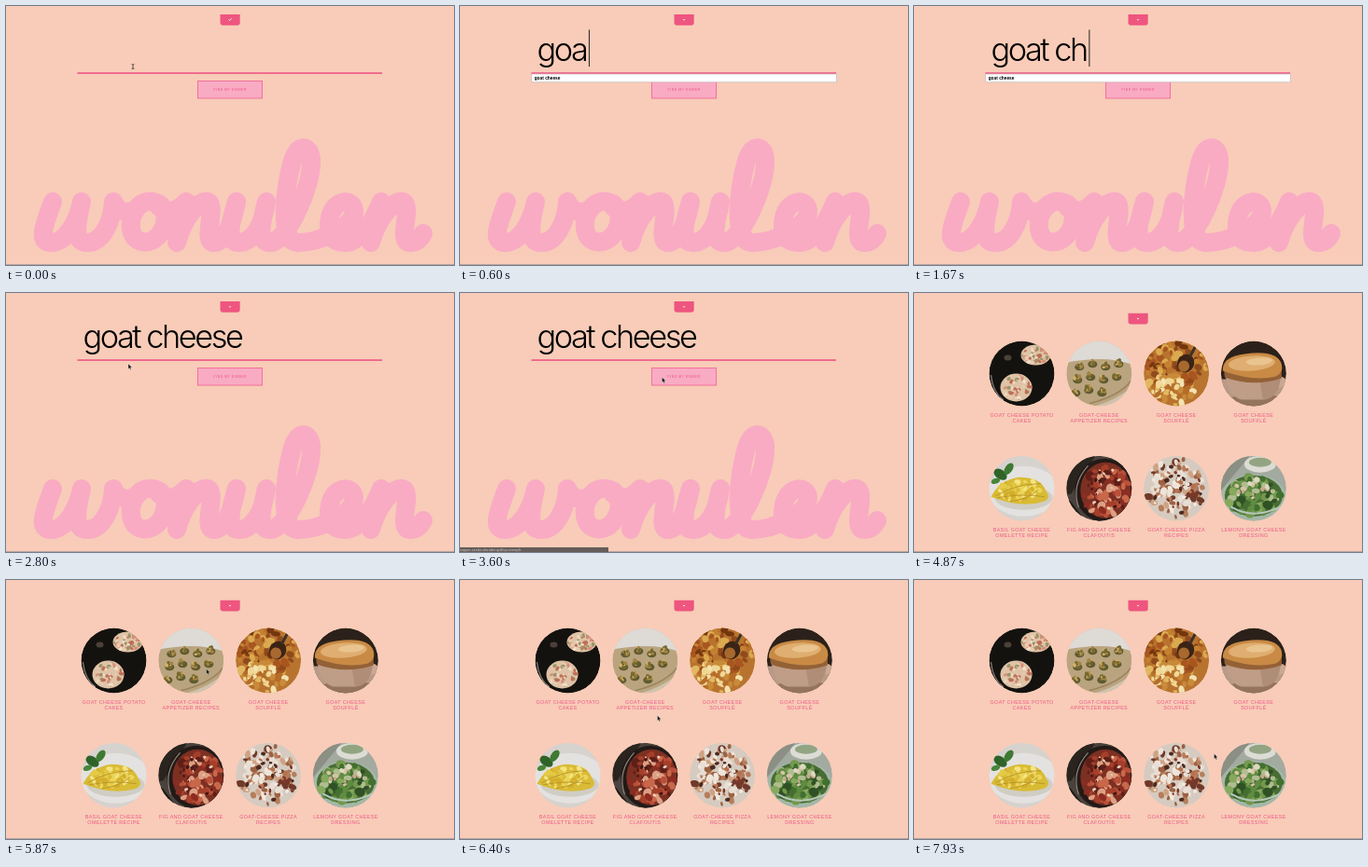
Write an HTML page that moves like this. It is 480 px wide and 278 px high and loops after 8 s.

```html
<!DOCTYPE html>
<html lang="en">
<head>
<meta charset="utf-8">
<title>Dinner finder</title>
<style>
html, body { margin: 0; width: 100%; height: 100%; overflow: hidden; background: #f8ccb8; }
svg { display: block; width: 100vw; height: 100vh; }
text { font-family: "Liberation Sans", Arial, sans-serif; white-space: pre; }
#typed { font: 300 34.3px Inter, sans-serif; letter-spacing: -2.45px; }
#list text { font-size: 4.8px; font-weight: bold; }
.label { font-size: 5.4px; letter-spacing: .38px; fill: #ee5686; text-anchor: middle; }
#button text { font-size: 3.3px; letter-spacing: .6px; fill: #ec5083; text-anchor: middle; }
#status text { font-size: 3.5px; font-weight: bold; fill: #fff; }
</style>
</head>
<body>
<svg id="stage" viewBox="0 0 480 278">
  <rect width="480" height="278" fill="#f8ccb8"/>
  <g id="home">
    <g fill="none" stroke="#f9abc4" stroke-width="20" stroke-linecap="round" stroke-linejoin="round">
      <path d="M50 210C43 230 32 254 48 254C65 254 77 230 81 210C76 232 71 254 87 254C104 254 114 230 115 210Q121 224 136 220"/>
      <path d="M161 211C145 205 132 222 134 239C137 260 162 257 169 237C173 224 170 214 161 211C169 226 184 220 193 210L183 254C190 228 207 207 216 210C227 214 209 254 223 254C234 254 243 232 247 210"/>
      <path d="M247 210C240 232 236 254 249 254C266 254 276 232 279 210C273 234 269 254 283 254C300 254 329 194 327 164C325 148 313 148 307 166C299 194 291 254 313 254"/>
      <path d="M313 254C334 254 374 238 373 219C371 205 351 208 347 227C343 245 350 254 363 254C379 254 393 232 402 210L391 254C398 228 416 207 425 210C437 214 418 254 433 254Q442 254 447 244"/>
    </g>
    <g id="button">
      <rect x="205.5" y="80.5" width="69" height="18.5" fill="#f9abc4" stroke="#f2709a"/>
      <text x="240.3" y="91">FIND MY DINNER</text>
    </g>
    <rect x="76.5" y="71.2" width="326.5" height="1.7" fill="#ef5c88"/>
    <g id="list"></g>
    <text id="typed" x="82.5" y="59"></text>
    <rect id="caret" y="25.5" width="1" height="39.5" fill="#222"/>
  </g>
  <g id="results"></g>
  <g id="tab">
    <path d="M229.5 9H250.7V17.8Q250.7 20.8 247.7 20.8H232.5Q229.5 20.8 229.5 17.8Z" fill="#ee557f"/>
    <path id="mark" fill="none" stroke="#fff" stroke-width=".8"/>
  </g>
  <rect y="277" width="480" height="1" fill="#b9a6a0"/>
  <g id="status">
    <rect y="273" width="159" height="5" fill="#665c59"/>
    <text x="0" y="276.9"></text>
  </g>
  <path id="beam" d="M134.6 62.5Q136 62.5 136 63.5Q136 62.5 137.4 62.5M136 63.5V67M134.6 67.6Q136 67.6 136 66.6Q136 67.6 137.4 67.6" fill="none" stroke="#333" stroke-width=".8"/>
  <path id="arrow" d="M0 0V5.6L1.3 4.4L2.2 6.5L3.1 6.1L2.2 4.1H4Z" fill="#111" stroke="#fff" stroke-width=".3"/>
</svg>
<script>
const LOOP = 8000;
const $ = id => document.getElementById(id);
const NS = "http://www.w3.org/2000/svg";

function add(parent, tag, attrs, text) {
  const el = document.createElementNS(NS, tag);
  for (const k in attrs) el.setAttribute(k, attrs[k]);
  if (text) el.textContent = text;
  parent.appendChild(el);
  return el;
}
const show = (el, on) => el.setAttribute("visibility", on ? "visible" : "hidden");

function random(seed) {
  return () => (seed = (seed * 16807) % 2147483647) / 2147483647;
}

// Dishes: each is painted around its own centre inside a circle of radius 35.
function oval(g, x, y, rx, ry, fill, turn = 0) {
  add(g, "ellipse", { cx: x, cy: y, rx, ry, fill, transform: `rotate(${turn} ${x} ${y})` });
}
function shape(g, d, fill) { add(g, "path", { d, fill }); }
function line(g, d, stroke, width) {
  add(g, "path", { d, stroke, "stroke-width": width, fill: "none", "stroke-linecap": "round" });
}
function scatter(g, seed, count, x, y, rx, ry, size, colors) {
  const rnd = random(seed * 7919);
  for (let i = 0; i < count; i++) {
    const a = rnd() * Math.PI * 2, r = Math.sqrt(rnd()), s = size * (.6 + rnd() * .7);
    oval(g, x + Math.cos(a) * r * rx, y + Math.sin(a) * r * ry, s, s * (.5 + rnd() * .4),
      colors[i % colors.length], rnd() * 180);
  }
}

const dishes = [
  { name: ["GOAT CHEESE POTATO", "CAKES"], base: "#14120f", paint(g) {
    line(g, "M-33 2Q-31 20-20 28", "#8a8580", 1.2);
    oval(g, -15, -17, 4, 3, "#4c4138");
    for (const [x, y, rx, ry] of [[15, -20, 16, 11], [-6, 15, 17, 15]]) {
      oval(g, x, y, rx, ry, "#dfc3a6");
      scatter(g, x + 40, 46, x, y, rx - 2, ry - 2, 2.2, ["#bd7058", "#f1dfca", "#9c9468", "#d48f78", "#e6cbb0"]);
    }
  } },
  { name: ["GOAT-CHEESE", "APPETIZER RECIPES"], base: "#b9a47f", paint(g) {
    shape(g, "M-35-35H35V-10Q8-20-35-12Z", "#dedad6");
    shape(g, "M35 14Q20 28-5 35H35Z", "#cfc3ae");
    line(g, "M34 8Q22 24-10 32", "#9b835d", 1.5);
    for (let i = 0; i < 11; i++) {
      const row = i / 4 | 0, x = -21 + (i % 4) * 14 - row * 2, y = -9 + row * 14 - (i % 2) * 3;
      oval(g, x, y + 2, 5, 3.8, "#5f5a30");
      scatter(g, i + 3, 9, x, y, 3.5, 3, 1.9, ["#a3843f", "#d2b06a", "#77692f"]);
    }
  } },
  { name: ["GOAT CHEESE", "SOUFFLÉ"], base: "#b8742f", paint(g) {
    scatter(g, 9, 90, 0, -10, 34, 25, 4, ["#8f4a1c", "#c5812f", "#a9551f", "#dba94f", "#74360f"]);
    scatter(g, 5, 60, -9, 18, 27, 17, 4, ["#e3b761", "#f0d894", "#c98b3a", "#f3e2b0", "#b56c28"]);
    oval(g, 10, -11, 9, 10, "#3b2415", 25);
    oval(g, 8, -8, 6, 6, "#a8692f", 25);
    line(g, "M15-19L23-34", "#3a3029", 3);
  } },
  { name: ["GOAT CHEESE", "SOUFFLÉ"], base: "#2c211a", paint(g) {
    shape(g, "M-35 6H35V35H-35Z", "#b99a88");
    oval(g, 3, 29, 30, 7, "#94735f");
    oval(g, 28, 9, 7, 6, "#c9a994");
    shape(g, "M-31-3H29Q27 27 10 28H-13Q-28 25-31-3Z", "#bf9d87");
    shape(g, "M6 4H29Q27 27 10 28Z", "#b08d77");
    shape(g, "M-32-6H30V5Q0 15-31 4Z", "#946136");
    shape(g, "M-33-3Q-34-18-10-21Q25-26 30-10Q32-1 24 3Q0 9-33-3Z", "#c98a45");
    oval(g, -2, -11, 25, 8, "#dfae70", -4);
    oval(g, 6, -13, 14, 4, "#e9c48f", -4);
  } },
  { name: ["BASIL GOAT CHEESE", "OMELETTE RECIPE"], base: "#d6d2ce", paint(g) {
    oval(g, 2, 3, 38, 27, "#e4e2e0");
    oval(g, 2, 10, 31, 13, "#d0cdc5");
    shape(g, "M-33 9Q-24-9-3-12Q21-12 26 3Q32 10 24 14Q0 22-33 9Z", "#d9bb35");
    scatter(g, 14, 40, -2, 2, 24, 11, 3.5, ["#ecd558", "#f4e584", "#d3ae2b", "#e5ca48"]);
    line(g, "M-28 8Q-6-5 20-5M-26 10Q2 5 24 9M-12 14Q6 12 17 2", "#b8942a", .9);
    oval(g, -23, -15, 8, 5, "#2f6328", 35);
    oval(g, -14, -21, 7, 4, "#3f7a33", -55);
    oval(g, -28, -8, 5, 3, "#4a853c", -20);
  } },
  { name: ["FIG AND GOAT CHEESE", "CLAFOUTIS"], base: "#4a423c", paint(g) {
    shape(g, "M-35-35H-4L-30 6H-35Z", "#2a241f");
    oval(g, 6, 2, 32, 34, "#231a17");
    line(g, "M-22 20Q-30-4-12-24", "#8d847c", 1.2);
    oval(g, 7, 2, 27, 30, "#7c3022");
    scatter(g, 12, 85, 7, 2, 25, 27, 4.2, ["#a53f2a", "#c9674a", "#5e1f19", "#dda083", "#8c2c22", "#b9503a"]);
    scatter(g, 6, 18, 8, 0, 20, 22, 1.8, ["#efcdb5", "#3d1512"]);
    line(g, "M-32 16L-20 32", "#1f1a18", 5);
  } },
  { name: ["GOAT-CHEESE PIZZA", "RECIPES"], base: "#d6cbc0", paint(g) {
    scatter(g, 21, 100, 0, 0, 32, 32, 3.8, ["#9d6243", "#eee4d9", "#70392a", "#cfa283", "#e8ded3", "#b67d5b"]);
    scatter(g, 33, 40, 0, 2, 28, 27, 2.3, ["#803628", "#4c2a20", "#f2ebe2", "#b4714f"]);
  } },
  { name: ["LEMONY GOAT CHEESE", "DRESSING"], base: "#a3aaa0", paint(g) {
    shape(g, "M-35-35H-4L-35 2Z", "#8b8f84");
    oval(g, 7, -26, 17, 9, "#dcdcd4");
    oval(g, 7, -28, 12, 5, "#93a482");
    oval(g, 0, 10, 35, 25, "#a4b8a8");
    oval(g, 0, 8, 31, 22, "#496c34");
    scatter(g, 17, 85, 0, 8, 29, 20, 4.5, ["#5f8c40", "#2f5125", "#86a95c", "#41702f", "#73984d", "#b0bd90"]);
    scatter(g, 28, 16, 0, 0, 20, 12, 2.8, ["#d5c3a8", "#c4a98c", "#dcd9c0"]);
    line(g, "M-24 20Q0 34 28 20", "#b6c8bd", 2);
  } }
];

const clip = add(add($("stage"), "defs", {}), "clipPath", { id: "disc" });
add(clip, "circle", { r: 35 });
dishes.forEach((dish, i) => {
  const x = 115.5 + (i % 4) * 82.8, y = i < 4 ? 86.5 : 209.7;
  const g = add($("results"), "g", { transform: `translate(${x} ${y})` });
  const plate = add(g, "g", { "clip-path": "url(#disc)" });
  add(plate, "circle", { r: 35, fill: dish.base });
  dish.paint(plate);
  dish.name.forEach((s, n) => add(g, "text", { class: "label", y: 46 + n * 6.2 }, s));
});

// Typing and suggestions
const phrase = "goat cheese";
const keyTimes = [270, 400, 600, 800, 1400, 1530, 1670, 1800, 1930, 2130, 2330];
const foods = ["goat cheese", "gorgonzola", "gouda", "garlic", "garlic powder", "ginger", "gelatin", "grapes",
  "grapefruit", "green beans", "green onion", "green tea", "ground beef", "ground pork", "gruyere", "guava", "gravy", "grits", "graham"];
const PICK = 2800;
let listed = -1;

function drawList(n) {
  if (n === listed) return;
  listed = n;
  const box = $("list");
  box.textContent = "";
  if (!n) return;
  const hits = foods.filter(f => f.startsWith(phrase.slice(0, n)));
  add(box, "rect", { x: 76.8, y: 73, width: 326.7, height: 1.6 + hits.length * 7.2, fill: "#fff", stroke: "#b9b0b4", "stroke-width": .6 });
  hits.forEach((f, i) => add(box, "text", { x: 79.7, y: 79.2 + i * 7.2 }, f));
}

const route = [
  [2530, 136, 66], [2730, 131, 76], [2850, 131, 76], [3330, 216.5, 90.5], [5800, 216.5, 90.5],
  [6100, 204, 126], [6400, 211.5, 145.5], [6600, 226, 166], [6800, 238, 188], [6870, 260, 225],
  [7330, 260, 225], [7530, 314, 196], [7730, 314, 196], [7930, 321.5, 186.5]
];
function pointAt(t) {
  let i = 0;
  while (i < route.length - 2 && t >= route[i + 1][0]) i++;
  const [t0, x0, y0] = route[i], [t1, x1, y1] = route[i + 1];
  const k = Math.min(1, Math.max(0, (t - t0) / (t1 - t0))), e = k * k * (3 - 2 * k);
  return [x0 + (x1 - x0) * e, y0 + (y1 - y0) * e];
}

function draw(t) {
  const found = t >= 4200;
  show($("home"), !found);
  show($("results"), found);

  const n = keyTimes.filter(k => t >= k).length;
  const typed = $("typed"), text = phrase.slice(0, n);
  if (typed.textContent !== text) typed.textContent = text;
  drawList(t < PICK ? n : 0);
  const caret = $("caret");
  caret.setAttribute("x", n ? 85.1 + typed.getComputedTextLength() : 84);
  caret.setAttribute("opacity", n && t < PICK ? 1 : 0);

  $("tab").setAttribute("transform", `translate(0 ${found ? 12.8 : 0})`);
  $("mark").setAttribute("d", t < 70 ? "M238.6 14.6L239.6 15.8L241.6 13.2" : "M239 14.1L240 15.3L241 14.1");

  // The pointer is hidden while the results load.
  const [x, y] = pointAt(t);
  $("arrow").setAttribute("transform", `translate(${x} ${y})`);
  show($("arrow"), t >= 2530 && !found || t >= 5800);
  show($("beam"), t < 270);

  const status = $("status"), label = status.lastElementChild;
  show(status, t >= 3600 && t < 4870);
  status.setAttribute("opacity", Math.min(1, Math.max(0, (4870 - t) / 340)));
  label.textContent = t < 3730 ? "supper-seeker-dorrabe.quillop.example" : "Waiting for supper-seeker-dorrabe.quillop.example...";
  label.setAttribute("opacity", t < 3730 ? .5 : 1);
}

function tick(now) {
  draw(now % LOOP);
  requestAnimationFrame(tick);
}
draw(0);
requestAnimationFrame(tick);
</script>
</body>
</html>
```
